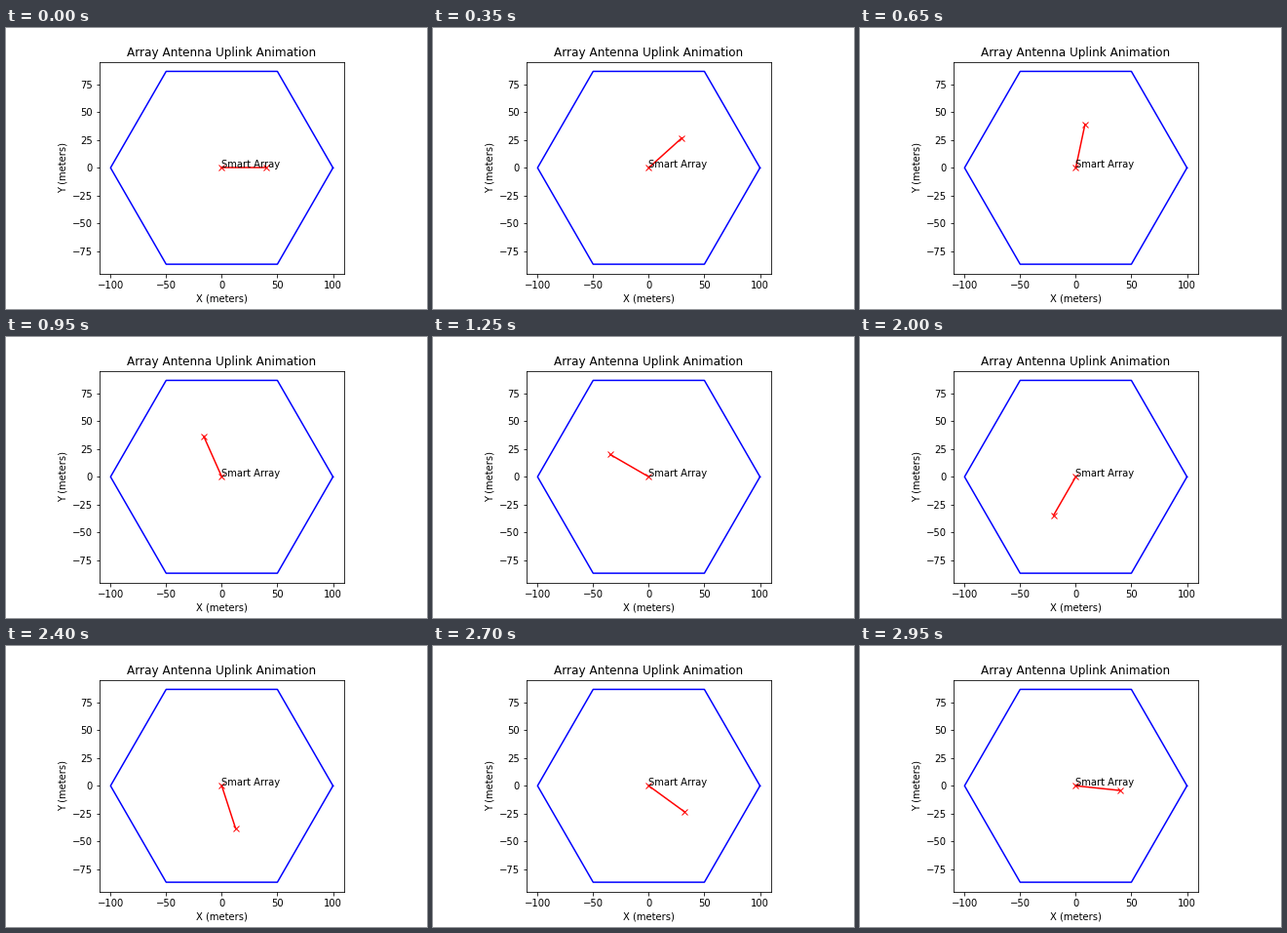
A matplotlib script that plays this animation: 432x288 px, repeating every 3 s.

```python
import numpy as np
import matplotlib.pyplot as plt
from matplotlib.animation import FuncAnimation

FRAMES = 60
INTERVAL = 50   # ms
CELL_RADIUS = 100
BEAM_LENGTH = 40

plt.rcParams.update({"font.family": "DejaVu Sans", "font.size": 10})

fig, ax = plt.subplots(figsize=(6, 4), dpi=72)
fig.subplots_adjust(left=0.125, right=0.9, bottom=0.125, top=0.88)

corners = np.radians(np.arange(0, 361, 60))
ax.plot(CELL_RADIUS * np.cos(corners), CELL_RADIUS * np.sin(corners), "b-")
ax.set_aspect("equal", adjustable="box")
height = CELL_RADIUS * np.sin(np.pi / 3)
ax.set_xlim(-1.1 * CELL_RADIUS, 1.1 * CELL_RADIUS)
ax.set_ylim(-1.1 * height, 1.1 * height)
ax.set_xticks(range(-100, 101, 50))
ax.set_yticks(range(-75, 76, 25))

ax.set_title("Array Antenna Uplink Animation")
ax.set_xlabel("X (meters)")
ax.set_ylabel("Y (meters)")
ax.text(0, 0, "Smart Array")

beam, = ax.plot([0, BEAM_LENGTH], [0, 0], "rx-")


def update(i):
    angle = 2 * np.pi * i / FRAMES
    beam.set_data([0, BEAM_LENGTH * np.cos(angle)],
                  [0, BEAM_LENGTH * np.sin(angle)])
    return beam,


anim = FuncAnimation(fig, update, frames=FRAMES, interval=INTERVAL,
                     repeat=True, repeat_delay=0)
plt.show()
```
